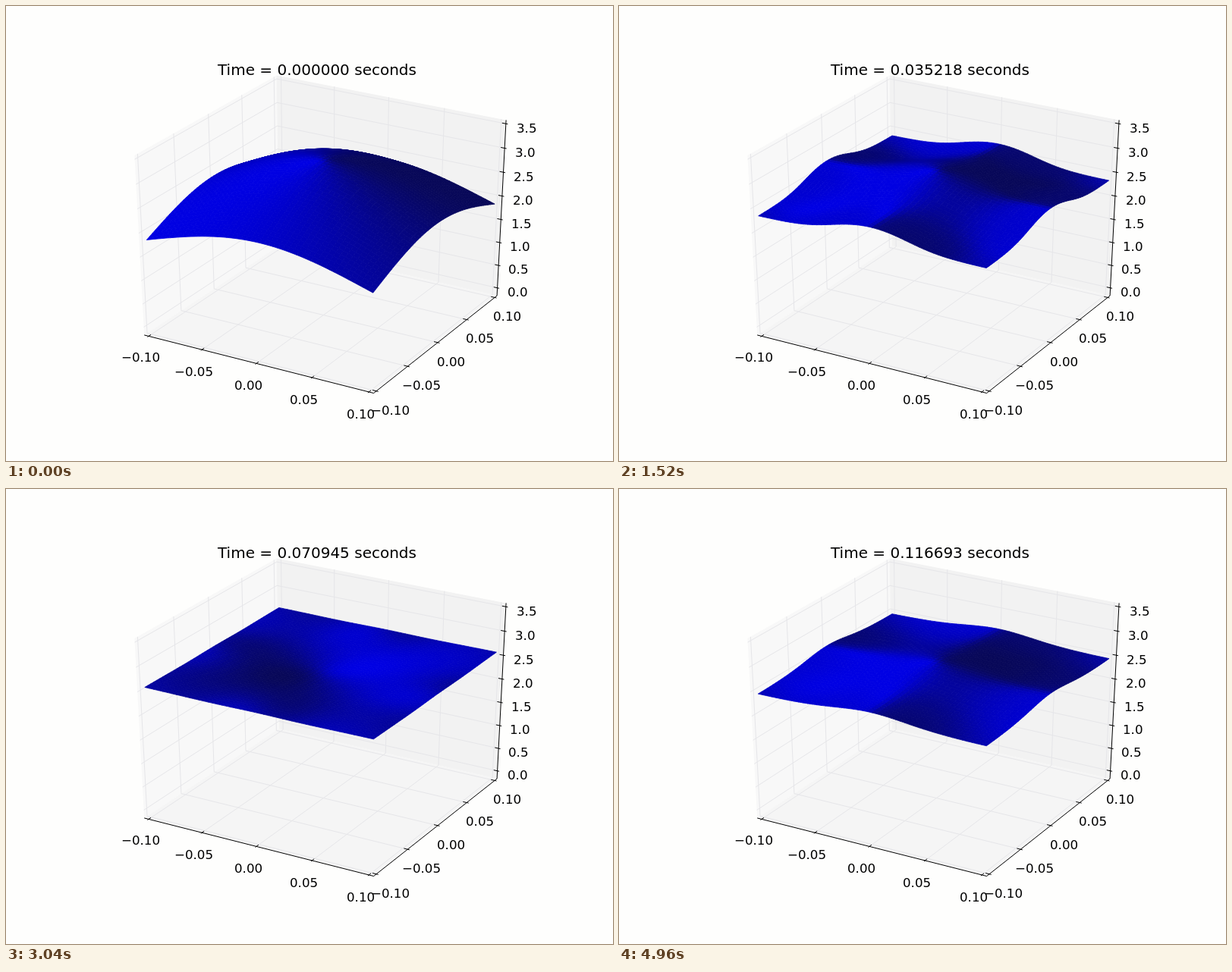
Write an HTML page with a canvas that moves like this. It is 800 by 600 pixels and loops after 5 s.

```html
<!DOCTYPE html>
<html>
<head>
<meta charset="utf-8">
<style>
  html, body { margin: 0; width: 100%; height: 100%; overflow: hidden; background: #fefefd; }
  canvas { display: block; }
</style>
</head>
<body>
<canvas id="stage" width="800" height="600"></canvas>
<script>
const ctx = document.getElementById('stage').getContext('2d');
const FRAMES = 125, FRAME_MS = 40;

// Simulated seconds at a frame: the solver's time step grows slowly.
const CLOCK = [[0, 0], [14, .012935], [38, .035218], [60, .055847], [92, .086123], [110, .103274], [124, .116693]];
function clock(f) {
  const k = Math.max(1, CLOCK.findIndex(c => c[0] >= f));
  const [a, ta] = CLOCK[k - 1], [b, tb] = CLOCK[k];
  return ta + (tb - ta) * (f - a) / (b - a) - 1.57e-7 * (f - a) * (b - f);
}

// Shallow water in a closed square basin. The flow is symmetric, so one
// quarter is solved, and the y momentum is the transposed x momentum.
// The outermost nodes lie on the plot's edge, the walls half a cell beyond.
const N = 25, W = N + 2, DX = .1 / (N - .5), GRAVITY = 9.81, VISCOSITY = .009, SUBSTEPS = 10;
const at = (i, j) => j * W + i;
let h = new Float64Array(W * W), p = new Float64Array(W * W);

function reflect() {
  for (let k = 0; k < W; k++) {
    for (const [ghost, cell] of [[0, 1], [N + 1, N]]) {
      h[at(ghost, k)] = h[at(cell, k)];
      h[at(k, ghost)] = h[at(k, cell)];
      p[at(k, ghost)] = p[at(k, cell)];
      p[at(ghost, k)] = -p[at(cell, k)];
    }
  }
}

function step(dt) {
  reflect();
  const nextH = h.slice(), nextP = p.slice();
  const c = dt / (2 * DX), d = VISCOSITY * dt / (DX * DX);
  const push = k => p[k] * p[k] / h[k] + GRAVITY * h[k] * h[k] / 2;
  for (let j = 1; j <= N; j++) for (let i = 1; i <= N; i++) {
    const k = at(i, j), l = k - 1, r = k + 1, b = k - W, t = k + W;
    const qb = p[at(j - 1, i)], qt = p[at(j + 1, i)];
    nextH[k] += d * (h[l] + h[r] + h[b] + h[t] - 4 * h[k]) - c * (p[r] - p[l] + qt - qb);
    nextP[k] += d * (p[l] + p[r] + p[b] + p[t] - 4 * p[k])
      - c * (push(r) - push(l) + p[t] * qt / h[t] - p[b] * qb / h[b]);
  }
  h = nextH;
  p = nextP;
}

for (let j = 1; j <= N; j++) for (let i = 1; i <= N; i++) {
  const x = (i - .5) * DX, y = (j - .5) * DX;
  h[at(i, j)] = 1.11 + 2 * Math.exp(-(x * x + y * y) / (2 * .1 * .1));
}
const heights = [h];
for (let f = 1; f < FRAMES; f++) {
  const dt = (clock(f) - clock(f - 1)) / SUBSTEPS;
  for (let s = 0; s < SUBSTEPS; s++) step(dt);
  heights.push(h);
}

// Perspective view of the unit cube around the origin, azimuth -60, elevation 30.
function project(x, y, z) {
  const w = 10 - (.4330 * x - .75 * y + .5 * z);
  return [
    100 + 620 / .185 * ((.8660 * x + .5 * y) / w + .095),
    540 - 480 / .185 * ((-.25 * x + .4330 * y + .8660 * z) / w + .095)
  ];
}
const cubeZ = z => (z + .1) / 3.6 - .5;

function trace(points) {
  ctx.beginPath();
  for (const [x, y] of points) ctx.lineTo(x, y);
}
function line(color, ...points) {
  trace(points.map(q => project(...q)));
  ctx.strokeStyle = color;
  ctx.stroke();
}
function pane(color, ...points) {
  trace(points.map(q => project(...q)));
  ctx.fillStyle = color;
  ctx.fill();
}
function centered(text, x, y) {
  ctx.fillText(text, Math.round(x - ctx.measureText(text).width / 2), Math.round(y));
}
function label(text, pos, dx, dy) {
  const [x, y] = project(...pos);
  centered(text.replace('-', '\u2212'), x + dx, y + dy);
}

const E = .5 + 1 / 48, TEXT = .5846, IN = E - .2 / 12, OUT = E + .1 / 12;
const flatTicks = [-.1, -.05, 0, .05, .1];
const heightTicks = [0, .5, 1, 1.5, 2, 2.5, 3, 3.5];

function drawBox() {
  const grid = '#e6e6e9', ink = '#000';
  pane('#f8f8f8', [-E, -E, -E], [-E, E, -E], [-E, E, E], [-E, -E, E]);
  pane('#f2f2f2', [-E, E, -E], [E, E, -E], [E, E, E], [-E, E, E]);
  pane('#f5f5f5', [-E, -E, -E], [E, -E, -E], [E, E, -E], [-E, E, -E]);
  ctx.lineWidth = 1;
  for (const v of flatTicks) {
    const s = v * 5;
    line(grid, [s, -E, -E], [s, E, -E], [s, E, E]);
    line(grid, [E, s, -E], [-E, s, -E], [-E, s, E]);
  }
  for (const v of heightTicks) {
    const z = cubeZ(v);
    line(grid, [E, E, z], [-E, E, z], [-E, -E, z]);
  }
  line(ink, [-E, -E, -E], [E, -E, -E], [E, E, -E], [E, E, E]);
  ctx.fillStyle = ink;
  ctx.font = '16.67px "DejaVu Sans", sans-serif';
  for (const v of flatTicks) {
    const s = v * 5;
    line(ink, [s, -IN, -E], [s, -OUT, -E]);
    line(ink, [IN, s, -E], [OUT, s, -E]);
    label(v.toFixed(2), [s, -TEXT, -TEXT], .4, 12.5);
    label(v.toFixed(2), [TEXT, s, -TEXT], -1, 12.5);
  }
  for (const v of heightTicks) {
    const z = cubeZ(v);
    line(ink, [IN, E, z], [OUT, E, z]);
    label(v.toFixed(1), [TEXT, TEXT, z], -1.4, 14.3);
  }
}

function drawSurface(field) {
  const M = 2 * N, side = .2 / (M - 1);
  const fold = i => i < N ? N - i : i - N + 1;
  const z = (i, j) => field[at(fold(i), fold(j))];
  const node = (i, j) => project(i / (M - 1) - .5, j / (M - 1) - .5, cubeZ(z(i, j)));
  const quads = [];
  let low = Infinity, high = -Infinity;
  for (let j = M - 2; j >= 0; j--) for (let i = 0; i < M - 1; i++) {
    const a = z(i, j), b = z(i + 1, j), c = z(i + 1, j + 1), d = z(i, j + 1);
    const zx = (b + c - a - d) / (2 * side), zy = (c + d - a - b) / (2 * side);
    const shade = (zx + zy + .5) / Math.hypot(zx, zy, 1);
    low = Math.min(low, shade);
    high = Math.max(high, shade);
    quads.push([i, j, shade]);
  }
  ctx.lineWidth = .8;
  for (const [i, j, shade] of quads) {
    const light = (shade - low) / (high - low), dim = Math.round(8 * (1 - light));
    trace([node(i, j), node(i + 1, j), node(i + 1, j + 1), node(i, j + 1)]);
    ctx.closePath();
    ctx.fillStyle = ctx.strokeStyle = `rgb(${dim},${dim},${Math.round(88 + 140 * light)})`;
    ctx.fill();
    ctx.stroke();
  }
}

let shown = -1;
function tick() {
  const f = Math.floor(performance.now() / FRAME_MS) % FRAMES;
  if (f !== shown) {
    shown = f;
    ctx.fillStyle = '#fefefd';
    ctx.fillRect(0, 0, 800, 600);
    drawBox();
    drawSurface(heights[f]);
    ctx.fillStyle = '#000';
    ctx.font = '20px "DejaVu Sans", sans-serif';
    centered(`Time = ${clock(f).toFixed(6)} seconds`, 409.5, 91);
  }
  requestAnimationFrame(tick);
}
tick();
</script>
</body>
</html>
```
